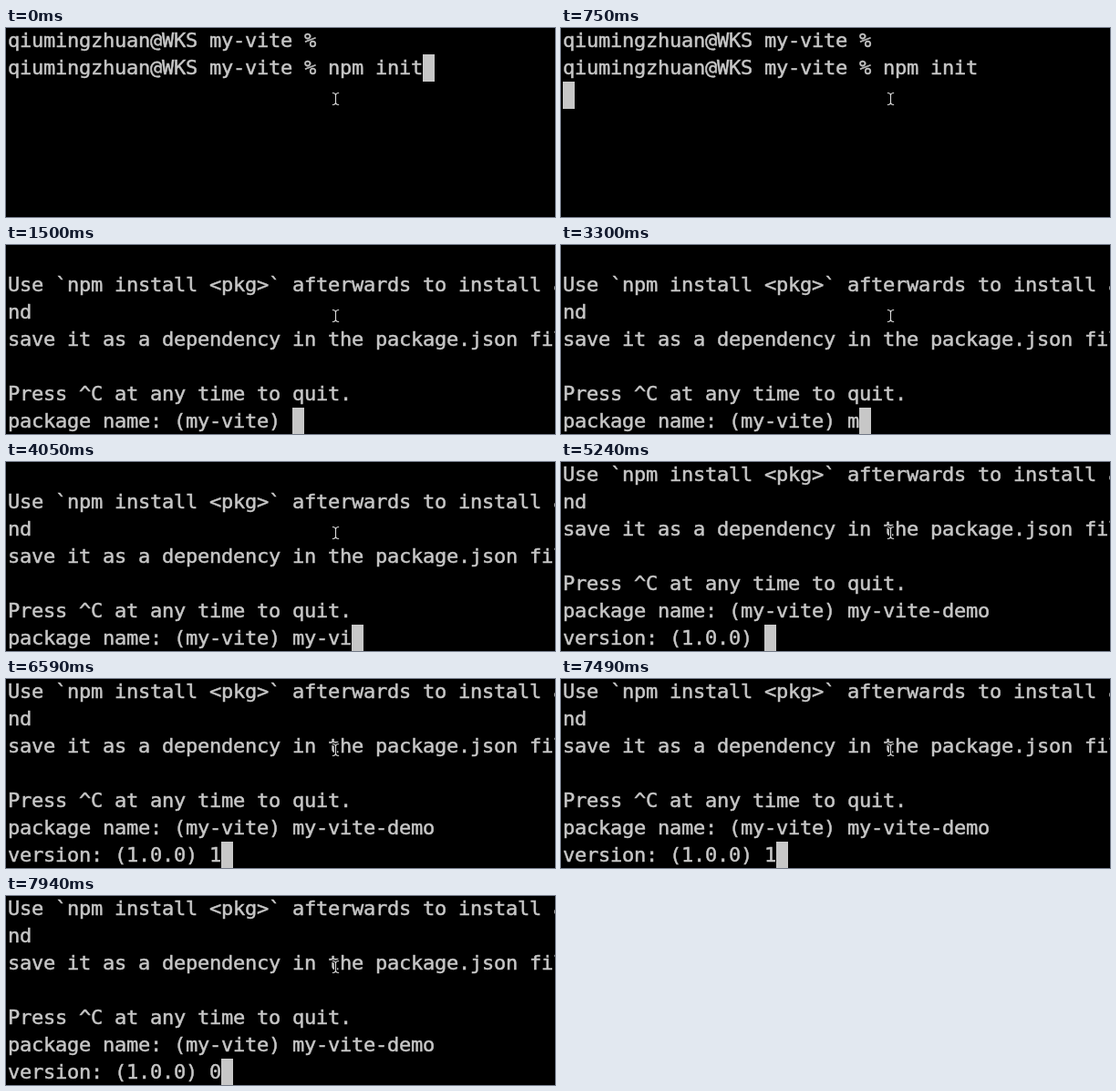
An HTML page that plays this animation: 602 by 208 pixels, repeating every 8 s.

```html
<!DOCTYPE html>
<html lang="en">
<head>
<meta charset="utf-8">
<title>npm init</title>
<style>
  html, body { margin: 0; width: 100%; height: 100%; overflow: hidden; background: #000; }
  #stage { position: relative; width: 602px; height: 208px; overflow: hidden; background: #000; }
  #screen {
    position: absolute; left: 2px; top: -1px; margin: 0;
    color: #c7c7c7; white-space: pre;
    font: 22px/30px "DejaVu Sans Mono", "Noto Sans Mono", monospace;
    letter-spacing: calc(13px - 1ch);
    font-variant-ligatures: none;
    -webkit-text-stroke: .5px #c7c7c7;
  }
  #caret { position: absolute; width: 13px; height: 30px; background: #c7c7c7; }
  svg { position: absolute; left: 0; top: 0; fill: none; stroke-linecap: round; }
</style>
</head>
<body>
<div id="stage">
  <pre id="screen"></pre>
  <div id="caret"></div>
  <svg width="602" height="208">
    <defs>
      <path id="beam" d="M358.3 71.5Q361.5 71.5 361.5 74.5Q361.5 71.5 364.7 71.5M361.5 74V82M358.3 84.5Q361.5 84.5 361.5 81.5Q361.5 84.5 364.7 84.5"/>
    </defs>
    <use href="#beam" stroke="#000" stroke-width="3"/>
    <use href="#beam" stroke="#dcdcdc" stroke-width="1.1"/>
  </svg>
</div>
<script>
const LOOP = 8000, CELL_W = 13, CELL_H = 30;
const screen = document.getElementById('screen');
const caret = document.getElementById('caret');

const prompt = 'qiumingzhuan@WKS my-vite % ';
const shell = prompt + '\n' + prompt + 'npm init';
const intro = [
  'Use `npm install <pkg>` afterwards to install a',
  'nd',
  'save it as a dependency in the package.json file.',
  '',
  'Press ^C at any time to quit.',
  'package name: (my-vite) '
].join('\n');
const name = 'my-vite-demo';
const version = intro + name + '\nversion: (1.0.0) ';

// [time, characters of the name typed so far]
const nameKeys = [[1500, 0], [3300, 1], [3450, 2], [3750, 3], [3900, 4], [4050, 5],
  [4190, 7], [4340, 8], [4640, 9], [4790, 11], [4940, 12]];

const steps = [
  [0, shell],
  [450, shell + ' '],
  [750, shell + ' \n'],
  ...nameKeys.map(([t, n]) => [t, '\n' + intro + name.slice(0, n)]),
  [5240, version],
  [6590, version + '1'],
  [6890, version + '1.'],
  [7490, version + '1'],
  [7640, version],
  [7940, version + '0']
];

let shown = null;

function show(text) {
  if (text === shown) return;
  shown = text;
  screen.textContent = text;
  const lines = text.split('\n');
  caret.style.left = 2 + lines[lines.length - 1].length * CELL_W + 'px';
  caret.style.top = (lines.length - 1) * CELL_H - 1 + 'px';
}

function draw(now) {
  const t = now % LOOP;
  show(steps.filter(s => s[0] <= t).pop()[1]);
}

const start = performance.now();
function tick() {
  draw(performance.now() - start);
  requestAnimationFrame(tick);
}
tick();
</script>
</body>
</html>
```
